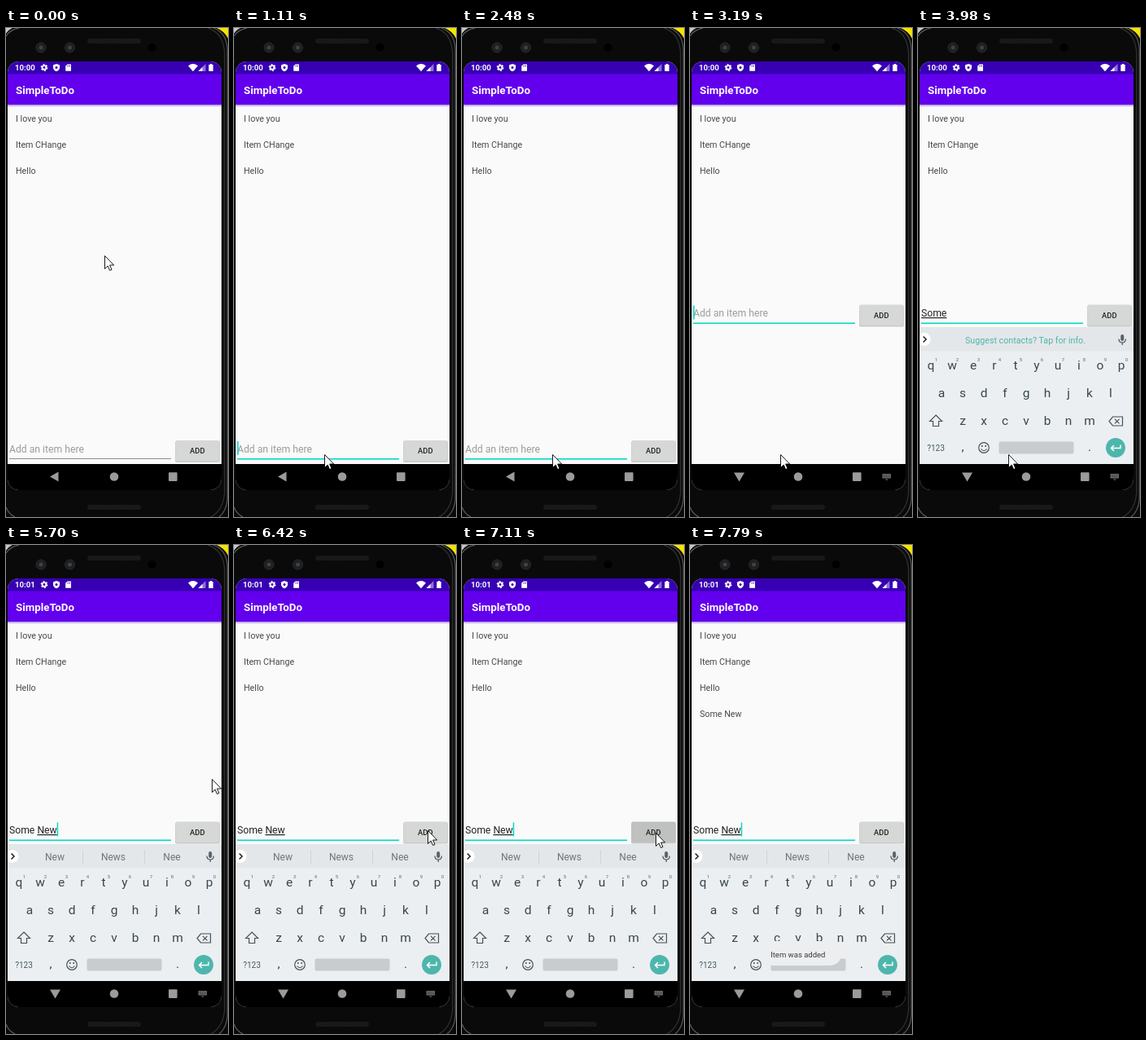
These frames come from a looping animation (273 px wide and 600 px high, 8 s). An HTML page:

```html
<!DOCTYPE html>
<html lang="en">
<head>
<meta charset="utf-8">
<title>To-do app demo</title>
<style>
html, body { margin: 0; width: 100%; height: 100%; overflow: hidden; background: #080808; }
svg { display: block; width: 100%; height: 100%; }
text { font-family: Roboto, "Open Sans", sans-serif; white-space: pre; }
.mid { text-anchor: middle; }
.medium { font-weight: 500; }
.bold { font-weight: 700; }
.item { font-size: 10.7px; fill: #484848; }
.edit { font-size: 12.2px; }
.key { font-size: 15.5px; fill: #37474f; }
.num { font-size: 6px; fill: #60696e; }
.sug { font-size: 12px; fill: #6c7579; }
.line { fill: none; stroke: #455055; stroke-width: 1.2; }
#word { text-decoration: underline #777; text-decoration-thickness: .7px; text-underline-offset: 1px; }
</style>
</head>
<body>
<svg viewBox="0 0 273 600" preserveAspectRatio="none">
  <defs>
    <clipPath id="screen"><rect x="2" y="41" width="263" height="526" rx="14"/></clipPath>
    <linearGradient id="shade" x2="0" y2="1">
      <stop stop-color="#a88be0"/><stop offset="1" stop-color="#fafafa"/>
    </linearGradient>
    <pattern id="mesh" width="3" height="3" patternUnits="userSpaceOnUse">
      <rect width="3" height="3" fill="#121212"/><path d="M0 3L3 0" stroke="#2b2b2b" stroke-width=".8"/>
    </pattern>
  </defs>

  <!-- phone body -->
  <rect width="273" height="600" fill="#0a0a0a"/>
  <path d="M259 0H273V13Q269 4 259 0Z" fill="#f5e400"/>
  <path d="M0 0H8Q3 2 0 7Z" fill="#c8c8c8"/>
  <g fill="none" stroke="#555" stroke-width="1.300">
    <path d="M0 10Q5 2 16 0M255 0Q272 6 272.300 28V578Q271 593 262 600M0 588Q3 596 11 600"/>
    <path d="M248 0Q268 6 268.800 32V570Q267 592 252 600" stroke="#303030"/>
  </g>
  <rect x="100" y="13" width="66" height="6" rx="3" fill="url(#mesh)"/>
  <rect x="100" y="585" width="66" height="6" rx="3" fill="url(#mesh)"/>
  <g fill="#1d1f21" stroke="#2a2c2e">
    <circle cx="43" cy="24" r="6"/><circle cx="78.500" cy="24" r="6"/>
  </g>
  <g fill="#3b4248"><circle cx="43" cy="24" r="2.500"/><circle cx="78.500" cy="24" r="2.500"/></g>
  <circle cx="179.500" cy="24" r="5" fill="#000"/>

  <g clip-path="url(#screen)">
    <rect y="41" width="273" height="526" fill="#fafafa"/>
    <rect y="94" width="273" height="3" fill="url(#shade)"/>
    <rect y="56" width="273" height="38" fill="#6200ee"/>
    <rect y="41" width="273" height="15.500" fill="#3700b3"/>
    <text id="clock" class="bold" x="11" y="52.300" font-size="9.600" fill="#fff"></text>
    <g fill="#fff">
      <circle cx="47" cy="48.500" r="2.400" fill="none" stroke="#fff" stroke-width="1.900"/>
      <circle cx="47" cy="48.500" r="3.700" fill="none" stroke="#fff" stroke-width="1.400" stroke-dasharray="1.940"/>
      <path d="M62 44L66 45.600V48.500Q66 51.800 62 53.200Q58 51.800 58 48.500V45.600Z"/>
      <circle cx="62" cy="48.500" r="1.500" fill="#3700b3"/>
      <path d="M75.500 44.500H80V52.800H73.200V46.800Z"/>
      <path d="M75.800 45.800V47.500M77.200 45.800V47.500M78.600 45.800V47.500" stroke="#3700b3" stroke-width=".7"/>
      <path d="M224 46.500Q230 41.600 236 46.500L230 53.200Z"/>
      <path d="M245.500 44V53H236.500Z" opacity=".45"/><path d="M241.500 48V53H236.500Z"/>
      <path d="M250.900 44H253.100V45H254.700V53H249.300V45H250.900Z"/>
      <text class="bold" x="12" y="80.700" font-size="13.300">SimpleToDo</text>
    </g>
    <text class="item" x="12" y="114.500">I love you</text>
    <text class="item" x="12" y="146.500">Item CHange</text>
    <text class="item" x="12" y="178.500">Hello</text>
    <text class="item" id="added" x="12" y="210.500">Some New</text>

    <!-- entry row, placed as it stands at the bottom -->
    <g id="row">
      <text id="hint" class="edit" x="4" y="520.500" fill="#9c9c9c">Add an item here</text>
      <text id="entry" class="edit" x="4" y="520.500" fill="#242424"><tspan id="done"></tspan><tspan id="word"></tspan></text>
      <rect id="under" x="4" y="528" width="199"/>
      <rect id="caret" y="507" width="1.500" height="17" fill="#03dac5"/>
      <rect x="208" y="507" width="55" height="26" rx="2" fill="#000" opacity=".2"/>
      <rect id="button" x="208.500" y="506" width="54" height="25.500" rx="1.500"/>
      <text class="mid medium" x="235.300" y="522" font-size="9.400" fill="#222">ADD</text>
    </g>

    <g id="board">
      <rect y="367" width="273" height="168" fill="#eceff1"/>
      <rect y="367" width="273" height="29.500" fill="#e4e7e9"/>
      <text id="tip" class="mid" x="132" y="386.500" font-size="10.700" fill="#4db6ac">Suggest contacts? Tap for info.</text>
      <path id="bars" d="M94.500 374V391M170.500 374V391" stroke="#cfd4d7"/>
      <g id="words">
        <text class="sug mid" x="60" y="387">New</text>
        <text class="sug mid" x="132" y="387">News</text>
        <text class="sug mid" x="204" y="387">Nee</text>
      </g>
      <circle cx="7.500" cy="382" r="8" fill="#fff"/>
      <path class="line" d="M6.500 378.500L10 382L6.500 385.500" style="stroke:#222;stroke-width:1.500"/>
      <rect x="249.200" y="376" width="4" height="8" rx="2" fill="#59636a"/>
      <path class="line" d="M247 381.500Q247 386 251.200 386Q255.400 386 255.400 381.500M251.200 386V389"/>
      <g id="keys"></g>
      <path class="line" d="M22 475L29.500 482.500H25.500V488.500H18.500V482.500H14.500Z"/>
      <path class="line" d="M239.500 477H251.500V488H239.500L235 482.500ZM242 479.800L247.500 485.300M247.500 479.800L242 485.300"/>
      <text class="mid" x="22" y="518.800" font-size="10" fill="#455a64">?123</text>
      <circle class="line" cx="81" cy="515" r="6.300"/>
      <path class="line" d="M77.500 516.500Q81 521 84.500 516.500"/>
      <circle cx="78.800" cy="513" r="1" fill="#455055"/><circle cx="83.200" cy="513" r="1" fill="#455055"/>
      <rect x="99.500" y="507.500" width="92" height="15" rx="2" fill="#c8cccf"/>
      <circle cx="243" cy="515" r="12" fill="#4db6ac"/>
      <path class="line" d="M249 511.500V515.500H237.500M241 512L237.500 515.500L241 519" style="stroke:#fff;stroke-width:1.500"/>
    </g>

    <g id="toast">
      <rect x="85" y="486" width="102" height="30" rx="15" fill="#eceeef"/>
      <text class="mid" x="132.800" y="506" font-size="9.500" fill="#3c3c3c">Item was added</text>
    </g>

    <rect y="535" width="273" height="33" fill="#000"/>
    <g fill="#9b9b9b">
      <path id="back"/>
      <circle cx="133" cy="550.500" r="5.300"/>
      <rect x="200" y="545.300" width="10.600" height="10.600" rx=".8"/>
      <g id="imeIcon" fill="#6e6e6e">
        <rect x="236.500" y="547" width="10.500" height="5.500" rx=".6"/>
        <path d="M237.500 548.700H246M237.500 550.600H246" stroke="#000" stroke-width=".8" stroke-dasharray=".8"/>
        <path d="M240 553.600H243.600L241.800 555.300Z"/>
      </g>
    </g>
  </g>
  <path id="mouse" d="M.5 .5V16.500L4.200 13L6.600 18.500L9 17.500L6.600 12H11.700Z" fill="#fff" stroke="#000" stroke-width=".9"/>
</svg>
<script>
const LOOP = 8000;
const $ = id => document.getElementById(id);
const show = (id, on) => $(id).style.display = on ? "" : "none";

const set = (id, attrs) => {
  for (const name in attrs) $(id).setAttribute(name, attrs[name]);
};

// letter keys: characters, first centre, baseline
const rows = [["qwertyuiop", 16, 419], ["asdfghjkl", 29, 452.5], ["zxcvbnm", 55, 486.5], [",", 55, 519], [".", 211, 519]];
const label = (kind, x, y, s) => `<text class="mid ${kind}" x="${x}" y="${y}">${s}</text>`;
$("keys").innerHTML = rows.map(([chars, x0, y], r) => [...chars].map((c, i) => {
  const x = x0 + i * 26;
  return label("key", x, y, c) + (r ? "" : label("num", x + 6.5, 408.5, (i + 1) % 10));
}).join("")).join("");

const start = {
  mouse: [121, 279], clock: "10:00", focus: false, caret: false, raised: false, board: false,
  done: "", word: "", strip: "tip", button: "#d6d7d7", added: false, toast: 0
};
const steps = [
  [120, { mouse: [107, 457] }],
  [280, { mouse: [128, 504] }],
  [550, { mouse: [122, 514] }],
  [830, { focus: true }],
  [1110, { mouse: [111, 523], caret: true }],
  [2480, { caret: false }],
  [2920, { caret: true }],
  [3060, { raised: true }],
  [3330, { board: true }],
  [3450, { word: "Some" }],
  [3980, { caret: false }],
  [4130, { done: "Some ", word: "", caret: true }],
  [4380, { strip: "" }],
  [4500, { word: "N" }],
  [4620, { strip: "bars" }],
  [4760, { word: "New", strip: "words" }],
  [5160, { clock: "10:01" }],
  [5290, { caret: false }],
  [5400, { mouse: [111, 521] }],
  [5550, { mouse: [205, 365] }],
  [5700, { mouse: [253, 287], caret: true }],
  [5860, { mouse: [240, 346] }],
  [6010, { mouse: [238, 359] }],
  [6160, { mouse: [238, 352] }],
  [6290, { caret: false }],
  [6420, { mouse: [238, 350] }],
  [6860, { caret: true }],
  [6990, { mouse: [238, 353], button: "#c9caca" }],
  [7110, { button: "#bfc0c0" }],
  [7250, { button: "#d6d7d7" }],
  [7400, { added: true, caret: false }],
  [7520, { toast: .5 }],
  [7650, { toast: 1 }],
  [7790, { caret: true, mouse: null }]
];

function draw(t) {
  const s = Object.assign({}, start, ...steps.filter(e => e[0] <= t).map(e => e[1]));
  $("clock").textContent = s.clock;
  $("done").textContent = s.done;
  $("word").textContent = s.word;
  show("hint", !(s.done + s.word));
  show("caret", s.caret);
  set("caret", { x: 4 + (s.done + s.word ? $("entry").getComputedTextLength() : 0) });
  set("under", s.focus ? { height: 1.6, fill: "#03dac5" } : { height: 1, fill: "#8c8c8c" });
  set("row", { transform: `translate(0 ${s.raised ? -166.5 : 0})` });
  set("button", { fill: s.button });
  show("board", s.board);
  show("tip", s.strip === "tip");
  show("bars", s.strip === "bars" || s.strip === "words");
  show("words", s.strip === "words");
  show("added", s.added);
  $("toast").style.opacity = s.toast;
  show("imeIcon", s.raised);
  set("back", { d: s.raised ? "M54 545.500H67L60.500 556.500Z" : "M64.500 544.500V556.500L54 550.500Z" });
  show("mouse", s.mouse);
  if (s.mouse) set("mouse", { transform: `translate(${s.mouse})` });
}

function tick() {
  draw(performance.now() % LOOP);
  requestAnimationFrame(tick);
}
tick();
</script>
</body>
</html>
```
